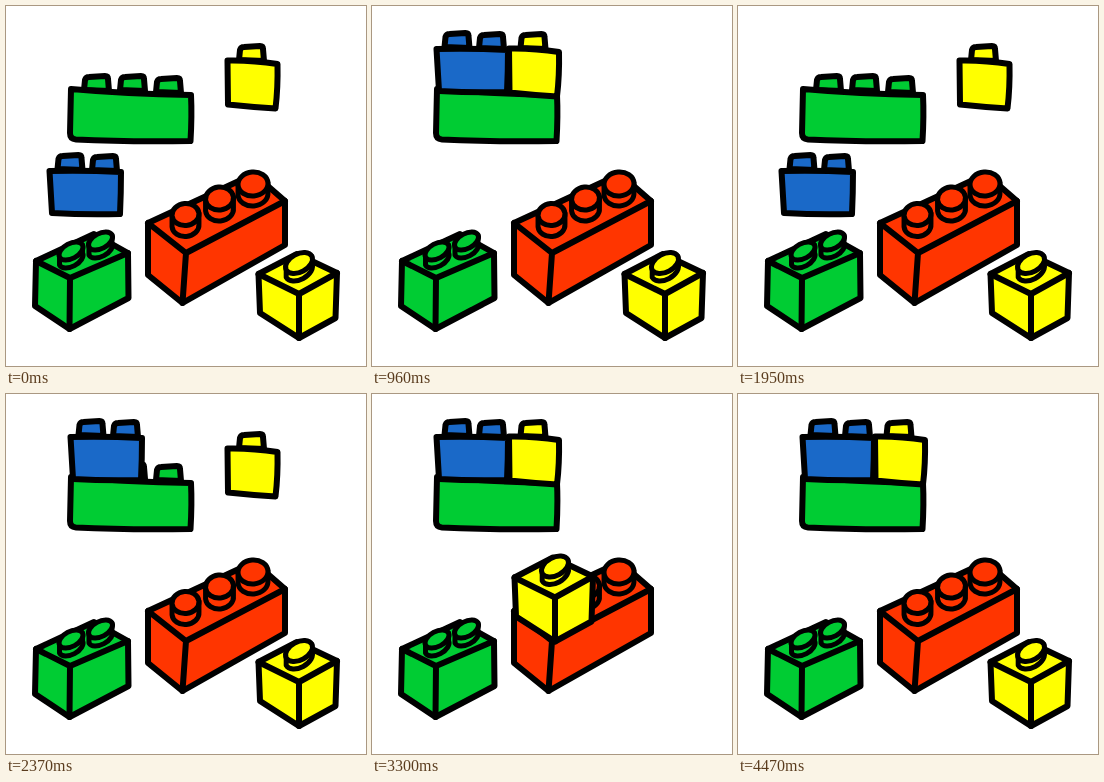
These frames come from a looping animation (360 by 360 pixels, 4500 ms). An HTML page:

```html
<!DOCTYPE html>
<html lang="en">
<head>
<meta charset="utf-8">
<title>Building bricks</title>
<style>
  html, body { margin: 0; width: 100%; height: 100%; overflow: hidden; background: #fff; }
  svg { display: block; width: 100vw; height: 100vh; }
</style>
</head>
<body>
<svg id="stage" viewBox="0 0 360 360" stroke="#000" stroke-width="6" stroke-linejoin="round" stroke-linecap="round"></svg>
<script>
const LOOP = 4500, HOLD = 372, LEAD = 40, STEPS = 5;
const GREEN = '#00cc33', BLUE = '#1a69c8', YELLOW = '#ffff00', RED = '#ff3500';
const stage = document.getElementById('stage');

const path = (d, extra = '') => `<path d="${d}" ${extra}/>`;
const poly = points => path('M' + points.map(p => p.join()).join('L') + 'Z');

// Flat stud: slightly tapered, rounded at the top.
const flatStud = (x, y, w = 25) =>
  path(`M${x} ${y + 14}L${x + 1} ${y + 4}Q${x + 2} ${y + 1} ${x + 5} ${y + 1}L${x + w - 4} ${y}Q${x + w - 1} ${y} ${x + w - 1} ${y + 3}L${x + w} ${y + 15}Z`);

// Round stud: a tilted cap on a collar with the same curve.
function roundStud(x, y, rx, ry, tilt, depth) {
  const angle = tilt * Math.PI / 180;
  const dx = rx * Math.cos(angle), dy = rx * Math.sin(angle);
  const collar = `M${x - dx} ${y - dy}v${depth}A${rx} ${ry} ${tilt} 0 0 ${x + dx} ${y + dy + depth}v${-depth}Z`;
  return `<g stroke-width="5">${path(collar)}
    <ellipse cx="${x}" cy="${y}" rx="${rx}" ry="${ry}" transform="rotate(${tilt} ${x} ${y})"/></g>`;
}

// Corners: left, back, right, front of the top; then left, front, right of the base.
function block([l, b, r, f, lb, fb, rb], studs) {
  return poly([l, b, r, rb, fb, lb]) + path(`M${l}L${f}L${r}M${f}L${fb}`, 'fill="none"') + studs;
}

// Each brick moves to its place at step "at"; order sets the overlap.
const bricks = [
  { color: GREEN, art:
    flatStud(78, 70) + flatStud(114, 70) + flatStud(150, 72) +
    path('M65 83Q120 88 185 89Q186 110 184.5 135Q120 136 70 133.5Q64 133 64 127Z') },
  { color: BLUE, at: 1, move: [21, -122], art:
    flatStud(51.5, 149) + flatStud(86, 150) +
    path('M43.5 165Q78 164 115 166Q115 187 114 208Q80 209 46 207Z') },
  { color: YELLOW, at: 2, move: [-84.5, -12], art:
    flatStud(233, 40) +
    path('M221.5 54.5Q246 54 271.5 58Q272 82 269.5 102.5Q245 101 222 98.5Z') },
  { color: RED, art: block(
    [[142, 217], [248, 168], [279, 195], [180, 247], [142, 269], [176.5, 297], [279, 239]],
    roundStud(179.5, 208.5, 13.5, 11, -5, 11) + roundStud(213.5, 192.5, 14, 11.5, -6, 11) +
    roundStud(247, 178, 15, 12, -5, 10)) },
  { color: GREEN, at: 4, move: [156, -102], art: block(
    [[30, 255], [88, 228], [122, 247], [64, 272], [29, 300], [63.5, 323], [122.5, 292]],
    roundStud(65, 245, 13, 7.5, -28, 8) + roundStud(94.5, 235, 13, 7.5, -28, 8)) },
  { color: YELLOW, at: 3, move: [-110, -84.5], art: block(
    [[252.5, 268], [291, 248], [331, 267], [293, 288], [254, 307], [293, 332], [329.5, 312]],
    roundStud(293, 257, 14.5, 9, -28, 7.5)) }
];

stage.innerHTML = bricks.map(b => `<g fill="${b.color}">${b.art}</g>`).join('');
const groups = [...stage.children];

function draw(time) {
  const step = Math.floor((time % LOOP + LEAD) / HOLD) % STEPS;
  bricks.forEach((brick, i) => {
    const [x, y] = brick.at && step >= brick.at ? brick.move : [0, 0];
    groups[i].setAttribute('transform', `translate(${x} ${y})`);
  });
}

const start = performance.now();
function tick() {
  draw(performance.now() - start);
  requestAnimationFrame(tick);
}
tick();
</script>
</body>
</html>
```
